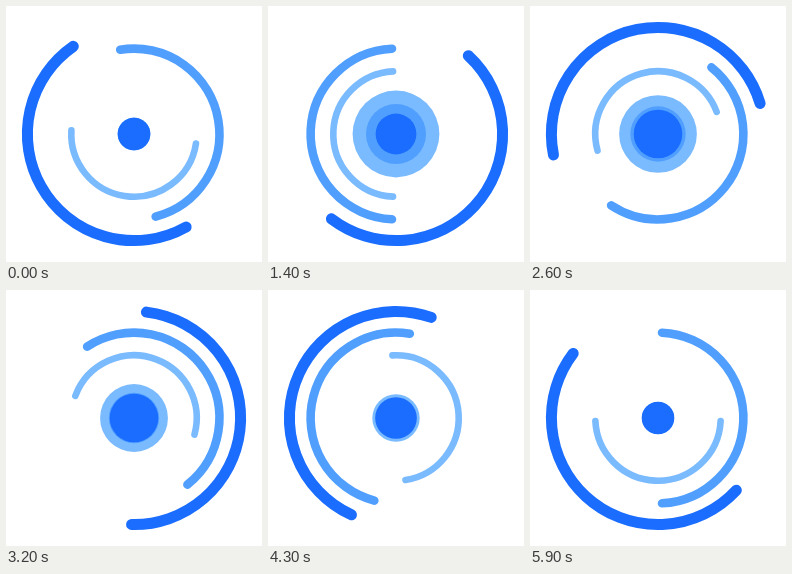
Animation of 256x256 px, one loop 6000 ms. Source, as an HTML page with a canvas:

```html
<!DOCTYPE html>
<html lang="en">
<head>
<meta charset="utf-8">
<title>Orbit loader</title>
<style>
  html, body { margin: 0; width: 100%; height: 100%; overflow: hidden; background: #fff; }
  canvas { display: block; width: 256px; height: 256px; }
</style>
</head>
<body>
<canvas id="stage" width="256" height="256"></canvas>
<script>
const ctx = document.getElementById('stage').getContext('2d');
const CENTER = 128, LOOP = 6000, STEP = 100, RAD = Math.PI / 180;
const DARK = '#1a6dff', MID = '#509fff', LIGHT = '#7abaff';
const HALF_ARC = 87.3; // degrees on each side of an arc's middle

// middle: angle of the arc's middle at phase 0; turns: turns per loop
const arcs = [
  { radius: 106.6, width: 11, color: DARK, middle: 130, turns: 3 },
  { radius: 85.4, width: 8.6, color: MID, middle: 0, turns: -2 },
  { radius: 62.7, width: 6.6, color: LIGHT, middle: 90, turns: 1 }
];

// each disc swells until its peak phase, then shrinks back
const discs = [
  { min: 16, max: 43.4, peak: 0.25, color: LIGHT },
  { min: 16, max: 30, peak: 0.25, color: MID },
  { min: 16.3, max: 24.5, peak: 0.5, color: DARK }
];

const ease = x => (1 - Math.cos(Math.PI * x)) / 2;

function drawArc({ radius, width, color, middle, turns }, phase) {
  const angle = middle + 360 * turns * phase;
  ctx.beginPath();
  ctx.arc(CENTER, CENTER, radius, (angle - HALF_ARC) * RAD, (angle + HALF_ARC) * RAD);
  ctx.lineWidth = width;
  ctx.strokeStyle = color;
  ctx.stroke();
}

function drawDisc({ min, max, peak, color }, phase) {
  const swell = ease(phase < peak ? phase / peak : (1 - phase) / (1 - peak));
  ctx.beginPath();
  ctx.arc(CENTER, CENTER, min + (max - min) * swell, 0, 2 * Math.PI);
  ctx.fillStyle = color;
  ctx.fill();
}

function render() {
  // the motion advances in held steps, starting one step into the cycle
  const tick = Math.floor(performance.now() / STEP) + 1;
  const phase = (tick * STEP % LOOP) / LOOP;
  ctx.clearRect(0, 0, 256, 256);
  ctx.lineCap = 'round';
  arcs.forEach(arc => drawArc(arc, phase));
  discs.forEach(disc => drawDisc(disc, phase));
  requestAnimationFrame(render);
}
render();
</script>
</body>
</html>
```
